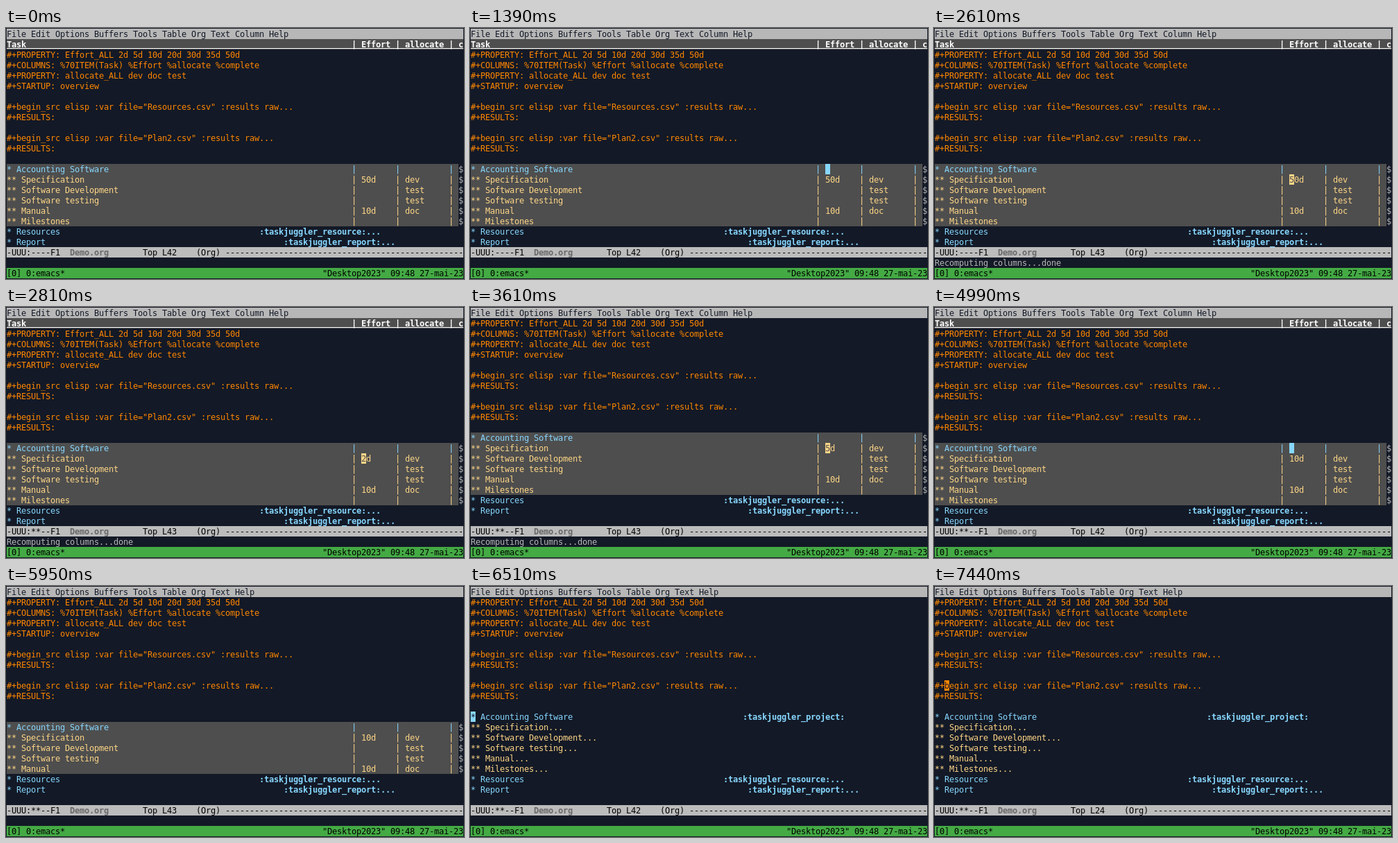
Recreate the animation shown at these times as an HTML page with a canvas. Size 660 by 362 pixels, loop 8 s.

```html
<!DOCTYPE html>
<html lang="en">
<head>
<meta charset="utf-8">
<title>Org column view in a terminal</title>
<style>
  html, body { margin: 0; width: 100%; height: 100%; overflow: hidden; background: #131926; }
  canvas { display: block; }
</style>
</head>
<body>
<canvas id="screen" width="660" height="362"></canvas>
<script>
const ctx = document.getElementById('screen').getContext('2d');
const COLS = 94, ROWS = 24, CELL_W = 7, CELL_H = 15, PAD = 1, BASELINE = 12;
const LOOP = 8000;
const FONT = '12px "DejaVu Sans Mono", monospace';

const BG = '#131926', FG = '#b7b7b7', GREY = '#4e4e4e', BAR = '#bcbcbc', GREEN = '#44aa44';
const ORANGE = '#ff8700', BLUE = '#87d7ff', YELLOW = '#ffd787';

const PREAMBLE = [
  '#+PROPERTY: Effort_ALL 2d 5d 10d 20d 30d 35d 50d',
  '#+COLUMNS: %70ITEM(Task) %Effort %allocate %complete',
  '#+PROPERTY: allocate_ALL dev doc test',
  '#+STARTUP: overview',
  '',
  '#+begin_src elisp :var file="Resources.csv" :results raw...',
  '#+RESULTS:',
  '',
  '#+begin_src elisp :var file="Plan2.csv" :results raw...',
  '#+RESULTS:',
  ''
];

// title, effort, allocate
const TASKS = [
  ['* Accounting Software', '', ''],
  ['** Specification', null, 'dev'],
  ['** Software Development', '', 'test'],
  ['** Software testing', '', 'test'],
  ['** Manual', '10d', 'doc'],
  ['** Milestones', '', '']
];

// first text row, first task row, task line missing while the terminal scrolls
const LAYOUTS = {
  header:   { text: 2, tasks: 13 },
  bare:     { text: 1, tasks: 12 },
  scrolled: { text: 1, tasks: 13, missing: 1 },
  closing:  { text: 1, tasks: 13, missing: 5 },
  plain:    { text: 1, tasks: 12 }
};

const BUSY = 'Recomputing columns...', DONE = BUSY + 'done';
const HOME = [0, 0];

// each step changes only the listed parts of the state
const STEPS = [
  [0,    { layout: 'header', effort: '50d', line: 42, flags: '--', echo: '', cursor: null }],
  [200,  { cursor: [13, 0] }],
  [1390, { cursor: [13, 73] }],
  [1930, { cursor: [14, 73], line: 43 }],
  [2570, { cursor: HOME, echo: BUSY }],
  [2610, { cursor: [14, 73], echo: DONE }],
  [2710, { layout: 'bare', effort: '2d', flags: '**', cursor: [13, 73] }],
  [2810, { layout: 'header', cursor: [14, 73] }],
  [3460, { echo: BUSY }],
  [3500, { echo: DONE }],
  [3560, { layout: 'scrolled', cursor: HOME }],
  [3610, { layout: 'bare', effort: '5d', cursor: [13, 73] }],
  [3710, { layout: 'header', cursor: [14, 73] }],
  [3810, { echo: BUSY }],
  [3850, { layout: 'scrolled', echo: DONE, cursor: HOME }],
  [3950, { layout: 'bare', effort: '10d', cursor: [13, 73] }],
  [4050, { layout: 'header', cursor: [14, 73] }],
  [4990, { cursor: [13, 73], line: 42, echo: '' }],
  [5200, { cursor: [12, 0], line: 41 }],
  [5540, { cursor: [13, 0], line: 42 }],
  [5750, { cursor: [14, 0], line: 43 }],
  [5950, { layout: 'closing', cursor: null }],
  [6510, { layout: 'plain', cursor: [12, 0], line: 42 }],
  [6660, { cursor: [11, 0], line: 41 }],
  [6810, { cursor: [10, 0], line: 40 }],
  [6980, { cursor: [9, 0], line: 24 }],
  [7210, { cursor: [9, 1] }],
  [7440, { cursor: [9, 2] }]
];

let grid;

function put(row, col, text, style) {
  [...text].forEach((ch, i) => {
    if (col + i < COLS) grid[row][col + i] = { ...grid[row][col + i], ...style, ch };
  });
}

function fillRow(row, style, width = COLS) {
  put(row, 0, ' '.repeat(width), style);
}

function putColumns(row, cells, style) {
  [0, 73, 82, 93].forEach((col, i) => put(row, col, cells[i] || '', style));
  [71, 80, 91].forEach(col => put(row, col, '|', style));
}

function putTask(row, [title, effort, allocate], state) {
  const top = title.startsWith('* ');
  const fg = top ? BLUE : YELLOW;
  if (state.layout === 'plain') {
    put(row, 0, title + (top ? '' : '...'), { fg });
    if (top) put(row, 56, ':taskjuggler_project:', { fg, bold: true });
    return;
  }
  fillRow(row, { fg, bg: GREY }, COLS - 1);
  putColumns(row, [title, effort ?? state.effort, allocate], { fg });
  put(row, COLS - 1, '$', { fg: FG });
}

function compose(state) {
  const layout = LAYOUTS[state.layout];
  grid = Array.from({ length: ROWS }, () =>
    Array.from({ length: COLS }, () => ({ ch: ' ', fg: FG, bg: BG })));

  const columnMenu = ['closing', 'plain'].includes(state.layout) ? '' : 'Column ';
  fillRow(0, { fg: BG, bg: FG });
  put(0, 0, `File Edit Options Buffers Tools Table Org Text ${columnMenu}Help`);

  if (state.layout === 'header') {
    fillRow(1, { fg: '#ffffff', bg: GREY, bold: true, underline: true });
    putColumns(1, ['Task', 'Effort', 'allocate', 'c']);
  }
  PREAMBLE.forEach((text, i) => put(layout.text + i, 0, text, { fg: ORANGE }));

  let row = layout.tasks;
  TASKS.forEach((task, i) => {
    if (i !== layout.missing) putTask(row++, task, state);
  });
  put(row, 0, '* Resources', { fg: BLUE });
  put(row, 52, ':taskjuggler_resource:...', { fg: BLUE, bold: true });
  put(row + 1, 0, '* Report', { fg: BLUE });
  put(row + 1, 57, ':taskjuggler_report:...', { fg: BLUE, bold: true });

  fillRow(21, { fg: '#000000', bg: BAR });
  put(21, 0, `-UUU:${state.flags}--F1`);
  put(21, 13, 'Demo.org', { fg: '#686868', bold: true });
  put(21, 28, `Top L${state.line}`);
  put(21, 39, '(Org) ' + '-'.repeat(49));
  put(22, 0, state.echo);

  fillRow(23, { fg: '#000000', bg: GREEN });
  put(23, 0, '[0] 0:emacs*');
  put(23, 65, '"Desktop2023" 09:48 27-mai-23');

  if (state.cursor) {
    const cell = grid[state.cursor[0]][state.cursor[1]];
    [cell.fg, cell.bg] = [cell.bg, cell.fg];
  }
}

function paint() {
  ctx.fillStyle = BG;
  ctx.fillRect(0, 0, 660, 362);
  grid.forEach((cells, row) => cells.forEach((cell, col) => {
    const x = PAD + col * CELL_W, y = PAD + row * CELL_H;
    ctx.fillStyle = cell.bg;
    ctx.fillRect(x, y, CELL_W, CELL_H);
  }));
  grid.forEach((cells, row) => cells.forEach((cell, col) => {
    const x = PAD + col * CELL_W, y = PAD + row * CELL_H;
    ctx.fillStyle = cell.fg;
    if (cell.underline) ctx.fillRect(x, y + BASELINE + 1, CELL_W, 1);
    if (cell.ch === ' ') return;
    ctx.font = (cell.bold ? 'bold ' : '') + FONT;
    ctx.fillText(cell.ch, x, y + BASELINE);
  }));
}

let shown = -1;
function frame() {
  const time = performance.now() % LOOP;
  const count = STEPS.filter(([start]) => start <= time).length;
  if (count !== shown) {
    shown = count;
    compose(Object.assign({}, ...STEPS.slice(0, count).map(([, change]) => change)));
    paint();
  }
  requestAnimationFrame(frame);
}
frame();
</script>
</body>
</html>
```
